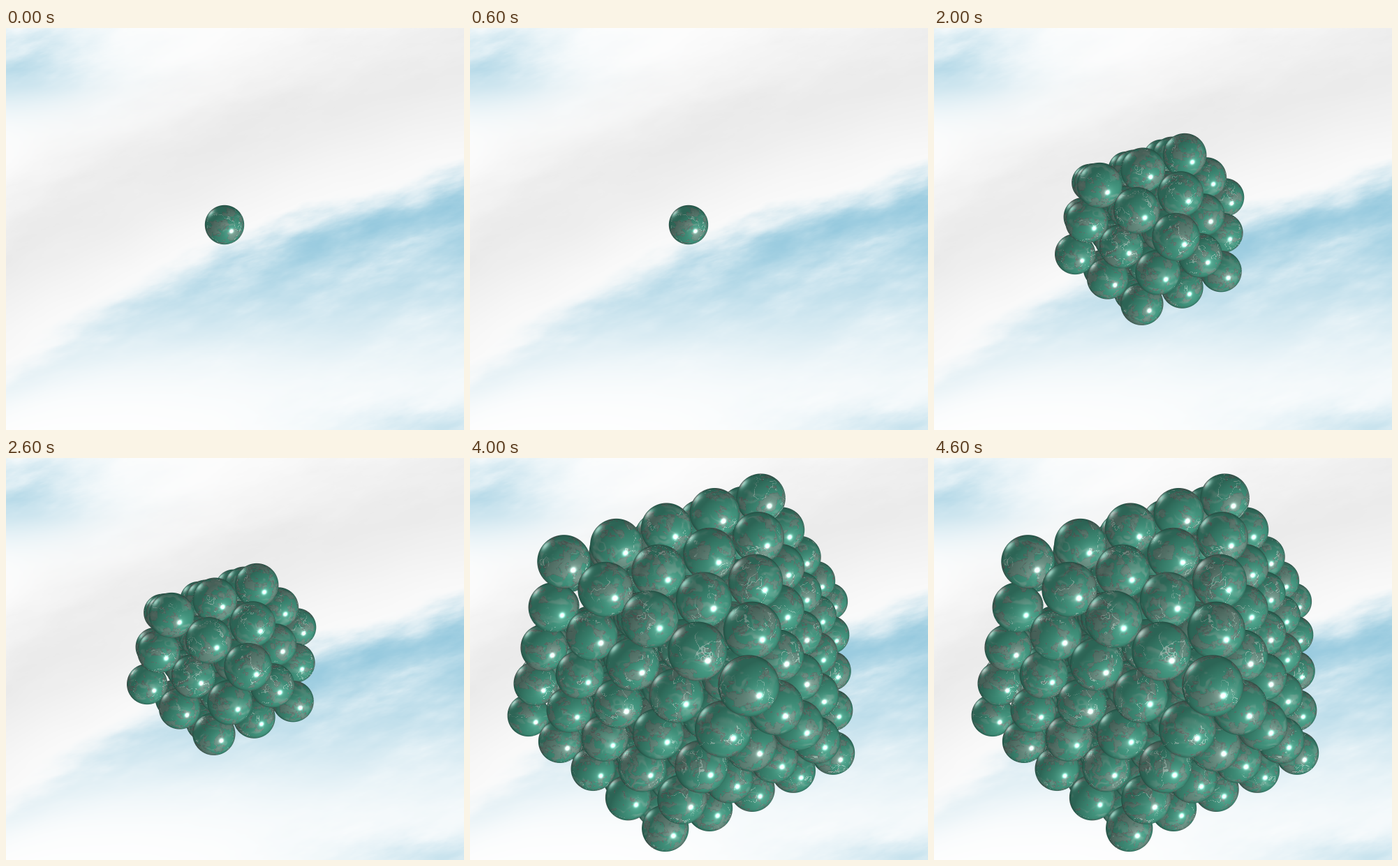
An HTML page with a canvas that plays this animation: 656x576 px, repeating every 5000 ms.

```html
<!DOCTYPE html>
<html lang="en">
<head>
<meta charset="utf-8">
<title>Growing sphere packing</title>
<style>
  html, body { margin: 0; width: 100%; height: 100%; overflow: hidden; background: #fff; }
  canvas { display: block; }
</style>
</head>
<body>
<canvas id="stage" width="656" height="576"></canvas>
<script>
const W = 656, H = 576, STEP = 1000, SHELLS = 5;
const ctx = document.getElementById('stage').getContext('2d');

const clamp = (v, lo = 0, hi = 1) => v < lo ? lo : v > hi ? hi : v;
const mix = (a, b, t) => a + (b - a) * t;
const smooth = (lo, hi, v) => {
  const t = clamp((v - lo) / (hi - lo));
  return t * t * (3 - 2 * t);
};
const bell = v => Math.exp(-v * v);
const dot = (a, b) => a[0] * b[0] + a[1] * b[1] + a[2] * b[2];
const unit = v => v.map(e => e / Math.hypot(...v));
const cross = (a, b) => [
  a[1] * b[2] - a[2] * b[1], a[2] * b[0] - a[0] * b[2], a[0] * b[1] - a[1] * b[0]
];

// Value noise in 0..1
function hash(x, y, z) {
  let h = Math.imul(x, 374761393) ^ Math.imul(y, 668265263) ^ Math.imul(z, 1274126177);
  h = Math.imul(h ^ (h >>> 13), 1103515245);
  h = Math.imul(h ^ (h >>> 15), 2146121005);
  return ((h ^ (h >>> 16)) >>> 0) / 4294967296;
}
function noise(x, y, z) {
  const i = Math.floor(x), j = Math.floor(y), k = Math.floor(z);
  let u = x - i, v = y - j, w = z - k;
  u *= u * (3 - 2 * u);
  v *= v * (3 - 2 * v);
  w *= w * (3 - 2 * w);
  const layer = c => mix(
    mix(hash(i, j, c), hash(i + 1, j, c), u),
    mix(hash(i, j + 1, c), hash(i + 1, j + 1, c), u), v);
  return mix(layer(k), layer(k + 1), w);
}
function fbm(x, y, z, octaves) {
  let sum = 0, amp = 0.5, total = 0;
  for (let o = 0; o < octaves; o++) {
    sum += amp * noise(x, y, z);
    total += amp;
    amp *= 0.55;
    x = x * 2.03 + 7.1; y = y * 2.03 + 3.7; z = z * 2.03 + 5.3;
  }
  return sum / total;
}

// Distance below the curve where the white cloud meets the blue
const belowEdge = (x, y) => y - (470 - .62 * x + .0003 * x * x);

function blueAt(x, y) {
  const e = belowEdge(x, y);
  const stream = mix(.32, 1, smooth(50, 480, x)) * smooth(-10, 65, e) * bell(e / (55 + .23 * Math.max(0, x)));
  const corner = .5 * bell(x / 130) * bell((y - 55) / 55);
  const floor = .3 * bell((x - 620) / 150) * bell((y - 580) / 40);
  return stream + corner + floor;
}
const greyAt = (x, y) => .7 * bell((belowEdge(x, y) + 140) / 115);

function paintSky() {
  const img = ctx.createImageData(W, H), d = img.data;
  const c = Math.cos(-.3), s = Math.sin(-.3);
  for (let y = 0, i = 0; y < H; y++) {
    for (let x = 0; x < W; x++, i += 4) {
      const u = (x * c + y * s) / 110, v = (y * c - x * s) / 36;
      const n = fbm(u, v, 2.4, 6) - .5;
      const m = noise(u * 1.7, v * .8, 9.2) - .5;
      const wx = x + 30 * m, wy = y + 50 * n;
      const blue = 1 - Math.exp(-.95 * blueAt(wx, wy) * clamp(1 + 2 * n, 0, 2));
      const grey = greyAt(wx, wy) * (1 + .5 * n) * (1 - blue);
      d[i] = 254 - 150 * blue - 26 * grey;
      d[i + 1] = 254 - 76 * blue - 26 * grey;
      d[i + 2] = 254 - 46 * blue - 26 * grey;
      d[i + 3] = 255;
    }
  }
  return img;
}

// Perspective camera; one lattice unit spans four shells
const CX = 313, CY = 282, RADIUS = 28.2, SCALE = 165, NEARING = .264;
const TOWARD = unit([.805, .562, .191]), RIGHT = unit([-.483, .817, -.314]);
const UP = cross(TOWARD, RIGHT);

// Cuboctahedral cluster of a face-centred cubic lattice, nearest ball first
function packing(n) {
  const balls = [];
  for (let i = -n; i <= n; i++)
    for (let j = -n; j <= n; j++)
      for (let k = -n; k <= n; k++) {
        if ((i + j + k) & 1 || Math.abs(i) + Math.abs(j) + Math.abs(k) > 2 * n) continue;
        const p = [i / 4, j / 4, k / 4], depth = 1 - NEARING * dot(TOWARD, p);
        const zoom = SCALE / depth;
        balls.push({
          x: CX + zoom * dot(RIGHT, p), y: CY - zoom * dot(UP, p), r: RADIUS / depth, depth,
          seed: [i * 3.7 + 40, j * 3.7 + 60, k * 3.7 + 80]
        });
      }
  return balls.sort((a, b) => a.depth - b.depth);
}

const LIGHT = unit([.62, .56, .55]);
const GLINT = unit([.35, .32, .88]);
const RIM = unit([-.7, -.6, .39]);

const GREEN = [63, 143, 121], MILK = [140, 168, 156], STONE = [124, 132, 126];
const ROSE = [116, 92, 97], CHALK = [172, 200, 189];

function marble(nx, ny, nz, seed) {
  const x = nx + seed[0], y = ny + seed[1], z = nz + seed[2];
  const warp = fbm(x * 1.5, y * 1.5, z * 1.5, 3);
  const swirl = noise(x * 2 + warp * 7, y * 5 + warp * 5, z * 3);
  const smear = fbm(x * 2.7 + warp * 3, y * 2.7, z * 2.7 + warp * 3, 4);
  const crack = Math.abs(fbm(x * 1.25 + 20, y * 1.25, z * 1.25, 4) - .5);
  const milk = .45 * smooth(.5, .95, swirl);
  const stone = .6 * smooth(.52, .64, smear);
  const rose = .6 * smooth(.03, 0, Math.abs(smear - .57));
  const chalk = .75 * smooth(.011, .002, crack) * smooth(.48, .62, noise(x * 1.1, y * 1.1, z * 1.1 + 9));
  return GREEN.map((v, ch) =>
    mix(mix(mix(mix(v, MILK[ch], milk), STONE[ch], stone), ROSE[ch], rose), CHALK[ch], chalk));
}

function paintBalls(sky, n) {
  const img = new ImageData(new Uint8ClampedArray(sky.data), W, H), d = img.data;
  const room = new Float32Array(W * H).fill(1);
  for (const b of packing(n)) {
    const x0 = Math.max(0, Math.floor(b.x - b.r - 1)), x1 = Math.min(W - 1, Math.ceil(b.x + b.r + 1));
    const y0 = Math.max(0, Math.floor(b.y - b.r - 1)), y1 = Math.min(H - 1, Math.ceil(b.y + b.r + 1));
    for (let y = y0; y <= y1; y++) {
      for (let x = x0; x <= x1; x++) {
        const at = y * W + x;
        if (room[at] < .01) continue;
        let nx = (x + .5 - b.x) / b.r, ny = (y + .5 - b.y) / b.r;
        const dist = Math.hypot(nx, ny);
        const cover = clamp((1 - dist) * b.r + .5);
        if (!cover) continue;
        if (dist > .999) { nx *= .999 / dist; ny *= .999 / dist; }
        const nz = Math.sqrt(1 - nx * nx - ny * ny), normal = [nx, ny, nz];
        const shade = (.7 + .36 * Math.max(0, dot(normal, LIGHT))) * mix(.76, 1, smooth(0, .55, nz));
        const glint = Math.max(0, dot(normal, GLINT)), rim = Math.max(0, dot(normal, RIM));
        const gloss = 225 * glint ** 190 + 28 * glint ** 18 + 110 * rim ** 38;
        const color = marble(nx, ny, nz, b.seed);
        const part = room[at] * cover;
        for (let ch = 0; ch < 3; ch++) {
          const i = at * 4 + ch;
          // Front to back: swap this share of sky for the ball
          d[i] += part * (Math.min(255, color[ch] * shade + gloss) - sky.data[i]);
        }
        room[at] -= part;
      }
    }
  }
  return img;
}

const sky = paintSky();
const scenes = Array.from({ length: SHELLS }, (_, n) => paintBalls(sky, n));
let shown = 0;
ctx.putImageData(scenes[0], 0, 0);

const start = performance.now();
function tick() {
  const now = Math.floor((performance.now() - start) / STEP) % SHELLS;
  if (now !== shown) ctx.putImageData(scenes[shown = now], 0, 0);
  requestAnimationFrame(tick);
}
requestAnimationFrame(tick);
</script>
</body>
</html>
```
